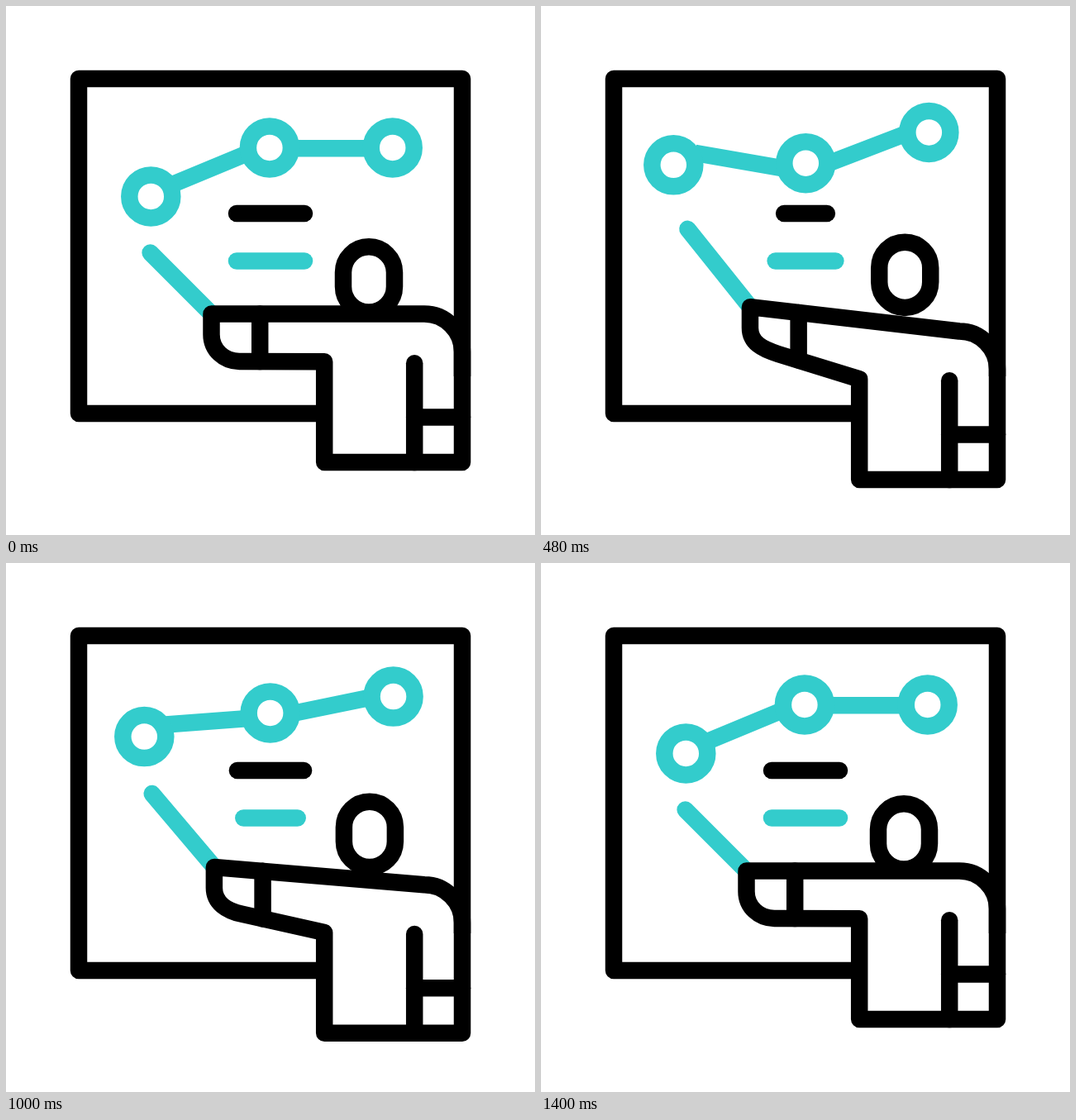
Animation of 640x640 px, one loop 1640 ms. Source, as an HTML page with a canvas:

```html
<!DOCTYPE html>
<html lang="en">
<head>
<meta charset="utf-8">
<title>Presenter at a chart board</title>
<style>
  html, body { margin: 0; width: 100%; height: 100%; overflow: hidden; background: #fff; }
  canvas { display: block; width: 640px; height: 640px; }
</style>
</head>
<body>
<canvas id="stage" width="640" height="640"></canvas>
<script>
const ctx = document.getElementById('stage').getContext('2d');
const LOOP = 1640, STEP = 40;
const BLACK = '#000', TEAL = '#33cccc';

const bezier = (a, b, s) => 3 * s * (1 - s) ** 2 * a + 3 * s * s * (1 - s) * b + s ** 3;

// Ease in-out: solve the curve's x for s by bisection, then return its y.
function ease(u) {
  if (u <= 0) return 0;
  if (u >= 1) return 1;
  let lo = 0, hi = 1;
  for (let i = 0; i < 24; i++) {
    const mid = (lo + hi) / 2;
    if (bezier(0.42, 0.58, mid) < u) lo = mid; else hi = mid;
  }
  return bezier(0, 1, lo);
}

// Rises from 0 to 1 between a and b, falls back between c and d.
const swing = (t, a, b, c, d) => ease((t - a) / (b - a)) - ease((t - c) / (d - c));

function stroke(color, cap, build) {
  ctx.strokeStyle = color;
  ctx.lineCap = cap;
  ctx.beginPath();
  build();
  ctx.stroke();
}

function line(color, x1, y1, x2, y2, cap = 'round') {
  stroke(color, cap, () => { ctx.moveTo(x1, y1); ctx.lineTo(x2, y2); });
}

function drawBoard() {
  stroke(BLACK, 'butt', () => {
    ctx.moveTo(385.2, 493);
    ctx.lineTo(88, 493);
    ctx.lineTo(88, 88);
    ctx.lineTo(552, 88);
    ctx.lineTo(552, 448);
  });
}

function drawChart(p) {
  const left = [175.3 - 18.2 * p, 230.4 - 46.2 * p];
  const mid = [318.9 + 1.7 * p, 171.4 + 22.8 * p];
  const right = [467.7 + 2 * p, 171.4 - 22.4 * p];
  const link = (a, dyA, b, dyB) =>
    line(TEAL, a[0] + 26, a[1] + dyA, b[0] - 26, b[1] + dyB, 'butt');
  link(left, -14.5, mid, 6.5);
  link(mid, 0.8, right, 0.8);
  for (const [x, y] of [left, mid, right]) {
    stroke(TEAL, 'butt', () => ctx.arc(x, y, 26, 0, Math.PI * 2));
  }
}

function drawTextBar(color, y, shrink) {
  line(color, 279 + 20.5 * shrink, y, 361 - 20.5 * shrink, y);
}

function drawPresenter(drop, lift) {
  const dy = 26.5 * drop;
  const hx = 248.5 + 2.55 * (drop + lift);
  const hy = 372.5 + dy - 31 * lift;
  const palm = { x: hx + 33.8, y: hy + 57.5 - 0.8 * lift };
  const shoulderY = 372.5 + dy, pitY = 430.3 + dy, baseY = 552 + dy;
  const topSlope = (shoulderY - hy) / (506 - hx);
  const lowSlope = (pitY - palm.y) / (385.2 - palm.x);

  line(TEAL, 174.6 + 3 * lift, hy - 74 - 21.5 * lift, hx, hy);

  ctx.lineCap = 'round';
  stroke(BLACK, 'round', () => {
    ctx.moveTo(hx, hy);
    ctx.lineTo(506, shoulderY);
    ctx.arc(506, shoulderY + 46, 46, -Math.PI / 2, 0);
    ctx.lineTo(552, baseY);
    ctx.lineTo(385.2, baseY);
    ctx.lineTo(385.2, pitY);
    ctx.lineTo(palm.x, palm.y);
    ctx.bezierCurveTo(palm.x - 18.5, palm.y - 18.5 * lowSlope, hx, hy + 43.5, hx, hy + 25);
    ctx.closePath();
  });

  const cuffX = hx + 58.7;
  line(BLACK, cuffX, hy + topSlope * 58.7, cuffX, palm.y + lowSlope * (cuffX - palm.x));
  line(BLACK, 494.2, 432.3 + dy, 494.2, baseY);
  line(BLACK, 494.2, 497.4 + dy, 552, 497.4 + dy);

  const headX = 408 + 1.3 * lift, headY = 291.3 + dy - 28.2 * lift;
  stroke(BLACK, 'butt', () => ctx.roundRect(headX, headY, 62, 79.3, 31));
}

function draw(t) {
  ctx.fillStyle = '#fff';
  ctx.fillRect(0, 0, 640, 640);
  ctx.lineWidth = 20.5;
  ctx.lineJoin = 'round';
  drawBoard();
  drawChart(swing(t, 83, 643, 703, 1258));
  drawTextBar(BLACK, 251, swing(t, 225, 620, 655, 1060));
  drawTextBar(TEAL, 308.6, swing(t, 350, 745, 775, 1180));
  drawPresenter(swing(t, 92, 658, 735, 1365), swing(t, 68, 560, 780, 1350));
}

const start = performance.now();
function tick() {
  const t = (performance.now() - start) % LOOP;
  draw(Math.floor(t / STEP) * STEP);
  requestAnimationFrame(tick);
}
tick();
</script>
</body>
</html>
```
